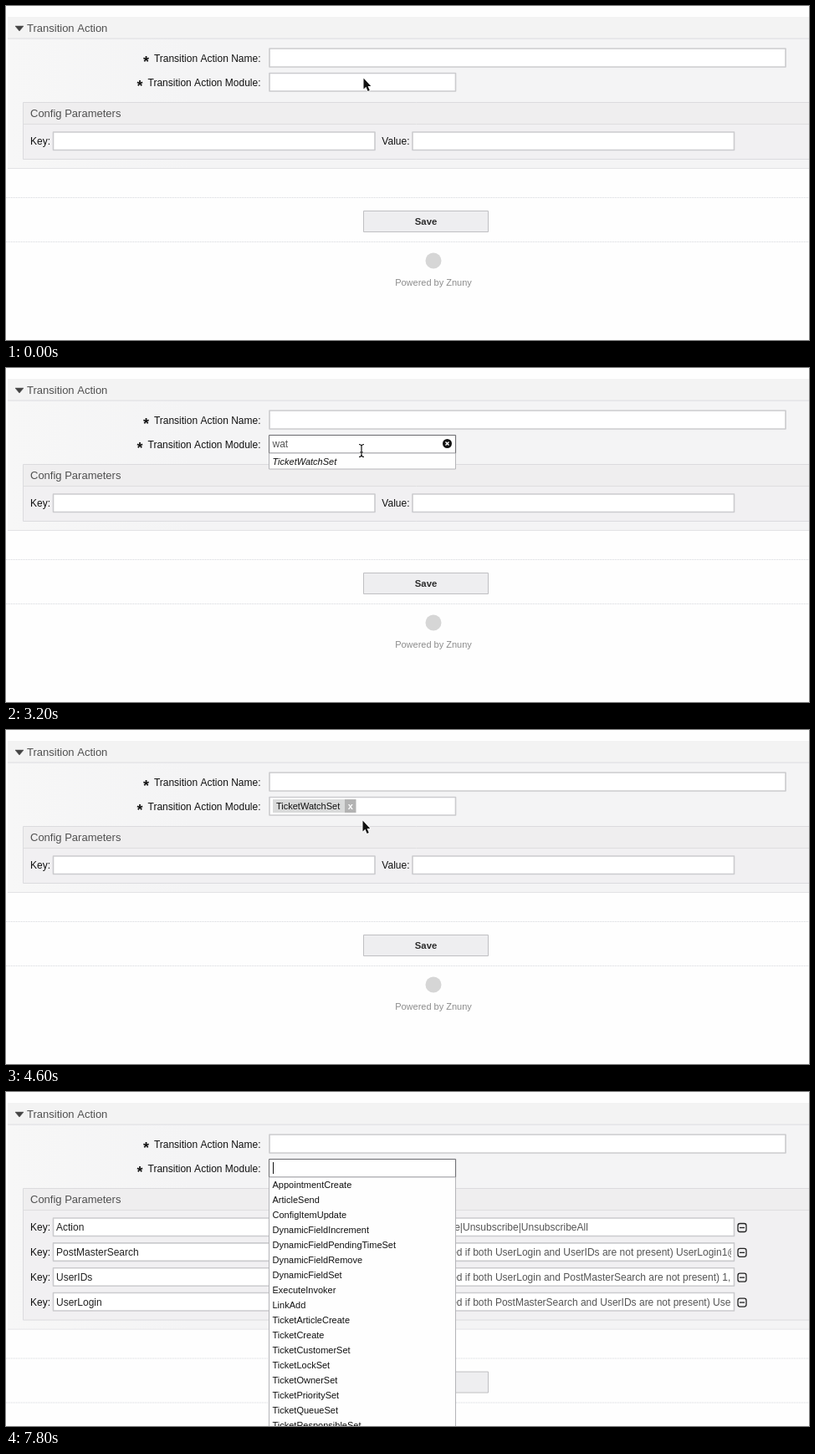
Write an HTML page with a canvas that moves like this. It is 960x400 px and loops after 8 s.

```html
<!DOCTYPE html>
<html lang="en">
<head>
<meta charset="utf-8">
<title>Transition action form</title>
<style>
html, body { margin: 0; width: 100%; height: 100%; overflow: hidden; background: #fefefe; }
canvas { display: block; }
</style>
</head>
<body>
<canvas id="stage" width="960" height="400"></canvas>
<script>
const ctx = document.getElementById('stage').getContext('2d');
const LOOP = 8000, STEP = 200, ROW = 29.85;
const FAMILY = '"Liberation Sans", Arial, Helvetica, sans-serif';
const MODULES = ['AppointmentCreate', 'ArticleSend', 'ConfigItemUpdate', 'DynamicFieldIncrement',
  'DynamicFieldPendingTimeSet', 'DynamicFieldRemove', 'DynamicFieldSet', 'ExecuteInvoker', 'LinkAdd',
  'TicketArticleCreate', 'TicketCreate', 'TicketCustomerSet', 'TicketLockSet', 'TicketOwnerSet',
  'TicketPrioritySet', 'TicketQueueSet', 'TicketResponsibleSet'];
const PARAMS = [
  ['Action', 'Subscribe|Unsubscribe|UnsubscribeAll'],
  ['PostMasterSearch', '(* required if both UserLogin and UserIDs are not present) UserLogin1@'],
  ['UserIDs', '(* required if both UserLogin and PostMasterSearch are not present) 1, 2'],
  ['UserLogin', '(* required if both PostMasterSearch and UserIDs are not present) UserLogin1'],
];
// time, shape, hot spot x, y
const POINTER = [
  [0, 'arrow', 427, 86], [600, 'beam', 427, 87.5], [1800, null, 427, 87.5],
  [3000, 'beam', 427, 90], [3200, 'beam', 425, 99], [3400, 'hand', 426, 108.5],
  [4400, 'hand', 426, 108.5], [4600, 'arrow', 426, 108], [6000, 'arrow', 426, 107],
  [6400, 'arrow', 426, 102], [6600, 'beam', 426, 95], [7000, 'beam', 426, 91],
  [7400, null, 426, 91], [LOOP, null, 426, 91],
];

function text(str, x, y, size = 12, color = '#111', style = '', align = 'left') {
  ctx.font = `${style} ${size}px ${FAMILY}`;
  ctx.fillStyle = color;
  ctx.textAlign = align;
  ctx.fillText(str, x, y);
}

function rect(x, y, w, h, color) {
  ctx.fillStyle = color;
  ctx.fillRect(x, y, w, h);
}

function frame(x, y, w, h, fill, stroke, width = 1) {
  rect(x, y, w, h, fill);
  ctx.strokeStyle = stroke;
  ctx.lineWidth = width;
  ctx.strokeRect(x, y, w, h);
}

function line(x1, y1, x2, y2, color, width = 1) {
  ctx.strokeStyle = color;
  ctx.lineWidth = width;
  ctx.beginPath();
  ctx.moveTo(x1, y1);
  ctx.lineTo(x2, y2);
  ctx.stroke();
}

function disc(x, y, r, color) {
  ctx.fillStyle = color;
  ctx.beginPath();
  ctx.arc(x, y, r, 0, Math.PI * 2);
  ctx.fill();
}

function input(x, y, w, h = 22) {
  frame(x, y, w, h, '#fff', '#cbcbce', 1.6);
}

function shape(path, fill, stroke, width) {
  const p = new Path2D(path);
  ctx.lineJoin = 'round';
  ctx.lineWidth = width;
  ctx.strokeStyle = stroke;
  ctx.stroke(p);
  ctx.fillStyle = fill;
  ctx.fill(p);
}

function label(str, y) {
  text(str, 304.5, y, 12, '#111', '', 'right');
  text('*', 304.5 - ctx.measureText(str).width - 13, y + 6, 18, '#111', 'bold');
}

function page(rows) {
  const shift = (rows - 1) * ROW;
  rect(0, 0, 960, 400, '#fefefe');
  const shade = ctx.createLinearGradient(2, 0, 220, 0);
  shade.addColorStop(0, '#f7f7f7');
  shade.addColorStop(1, '#f4f4f5');
  rect(2, 13, 958, 181 + shift, shade);
  rect(2, 13, 958, 26, '#f3f3f3');
  line(2, 39, 960, 39, '#dcdce0');
  line(2, 194.5 + shift, 960, 194.5 + shift, '#e2e2e5');
  shape('M11 24H21L16 30Z', '#444', '#444', 0.5);
  text('Transition Action', 25, 31, 13, '#505050');

  label('Transition Action Name:', 67);
  label('Transition Action Module:', 95.5);
  input(315, 51, 617);
  input(315, 80.5, 222.5, 21.5);

  frame(20.5, 115.5, 960, 68 + shift, '#f1f0f2', '#dbdbde');
  rect(21, 116, 939, 25, '#efeeef');
  line(21, 141.5, 960, 141.5, '#dededf');
  text('Config Parameters', 29, 133, 13, '#505050');
  for (let i = 0; i < rows; i++) parameter(i, rows > 1);

  ctx.setLineDash([1, 1]);
  for (const y of [229.5, 282.5]) line(0, y + shift, 960, y + shift, '#d5d7dc');
  ctx.setLineDash([]);
  frame(427.5, 245.5 + shift, 149, 25, '#eeeef0', '#bfbfc2');
  text('Save', 502, 261.5 + shift, 11.3, '#2b2b2b', 'bold', 'center');
  disc(511, 305 + shift, 9.5, '#d6d6d6');
  text('Powered by Znuny', 511, 334.5 + shift, 11, '#8c8c8c', '', 'center');
}

function parameter(i, filled) {
  const y = 151 + i * ROW;
  text('Key:', 29, y + 15);
  text('Value:', 482.5, y + 15, 12, '#111', '', 'right');
  input(56.5, y, 384.5, 21.5);
  input(486, y, 384.5, 21.5);
  if (!filled) return;
  text(PARAMS[i][0], 60, y + 15, 12, '#222');
  ctx.save();
  ctx.beginPath();
  ctx.rect(487, y, 380, 22);
  ctx.clip();
  text(PARAMS[i][1], 489.5, y + 15, 12, '#555');
  ctx.restore();
  ctx.strokeStyle = '#222';
  ctx.lineWidth = 1.3;
  ctx.beginPath();
  ctx.roundRect(875, y + 6.5, 10, 10, 2.5);
  ctx.stroke();
  line(877, y + 11.5, 883, y + 11.5, '#222', 1.3);
}

function menu(items, { alpha = 1, filtered = false, hover = false } = {}) {
  ctx.globalAlpha = alpha;
  frame(314.5, 102, 223, items.length * 18 + (items.length > 9 ? 40 : 1), '#fefefe', '#b4b4b8');
  if (hover) rect(315, 102, 222, 18.5, '#f08036');
  items.forEach((item, i) =>
    text(item, 318.5, 115.5 + i * 18 - (filtered ? 0 : 0.5), 11, '#111', filtered ? 'italic' : ''));
  ctx.globalAlpha = 1;
}

function focusField(typed, caret) {
  frame(314.5, 80.5, 223, 21.5, '#fff', '#707074');
  text(typed, 318.5, 95, 12, '#555');
  const end = 318.5 + ctx.measureText(typed).width;
  if (caret) rect(Math.round(end), 84, 1, 14, '#111');
  if (!typed) return;
  disc(527.5, 90.5, 5.5, '#111');
  line(525.5, 88.5, 529.5, 92.5, '#fff', 1.5);
  line(529.5, 88.5, 525.5, 92.5, '#fff', 1.5);
}

function tag() {
  rect(319, 83, 86, 16, '#d9dada');
  rect(405, 83, 13.5, 16, '#b3b3b3');
  text('TicketWatchSet', 323, 95, 11);
  text('x', 411.8, 94.5, 11, '#fff', 'bold', 'center');
}

function pointer(t) {
  const i = POINTER.findIndex(key => key[0] > t) - 1;
  const [start, kind, x, y] = POINTER[i], [end, , nx, ny] = POINTER[i + 1];
  if (!kind) return;
  const k = (t - start) / (end - start);
  ctx.save();
  ctx.translate(x + (nx - x) * k, y + (ny - y) * k);
  if (kind === 'arrow') {
    shape('M.5 .5V13.5L3.4 10.8L5.6 16L7.8 15L5.6 10H9.3Z', '#111', '#fff', 1.8);
  } else if (kind === 'beam') {
    const beam = 'M-3 -7.5Q0 -7.5 0 -5V5Q0 7.5 -3 7.5M3 -7.5Q0 -7.5 0 -5V5Q0 7.5 3 7.5M-2 2H2';
    shape(beam, 'transparent', '#fff', 2.8);
    shape(beam, 'transparent', '#111', 1.2);
  } else {
    shape('M-2 1Q-2 -.8 -.5 -.8Q1 -.8 1 1V5Q3 4 4 5.5Q5.5 4.8 6.3 6.2Q8 6 8 8Q8 12 6.5 14V16H-1V14L-5 8.8Q-5.5 7 -3.7 7L-2 9Z',
      '#fff', '#111', 1.3);
    for (const px of [1, 3.2, 5.3]) line(px, 9, px, 13, '#111', 0.8);
  }
  ctx.restore();
}

function draw(t) {
  page(t >= 4800 ? PARAMS.length : 1);
  if (t >= 1200 && t < 4200) {
    const typed = 'wat'.slice(0, t < 1800 ? 0 : t < 2200 ? 1 : t < 2400 ? 2 : 3);
    const caret = t < 2400 || (t - 2400) % 1000 < 500;
    focusField(typed, caret && t < 3400);
    if (t < 2000) menu(MODULES, { alpha: t < 1400 ? 0.15 : t < 1600 ? 0.66 : 1 });
    else menu(t < 2400 ? ['TicketOwnerSet', 'TicketWatchSet'] : ['TicketWatchSet'],
      { filtered: true, hover: t >= 3400 });
  } else if (t >= 4200 && t < 7200) {
    tag();
    if (t < 4600) menu(['TicketWatchSet'], { filtered: true, hover: true, alpha: t < 4400 ? 1 : 0.4 });
  } else if (t >= 7200) {
    focusField('', true);
    if (t >= 7400) menu(MODULES, { alpha: t < 7600 ? 0.6 : 1 });
  }
  pointer(t);
}

const origin = performance.now();
function tick() {
  const t = (performance.now() - origin) % LOOP;
  draw(Math.floor(t / STEP) * STEP);
  requestAnimationFrame(tick);
}
tick();
</script>
</body>
</html>
```
